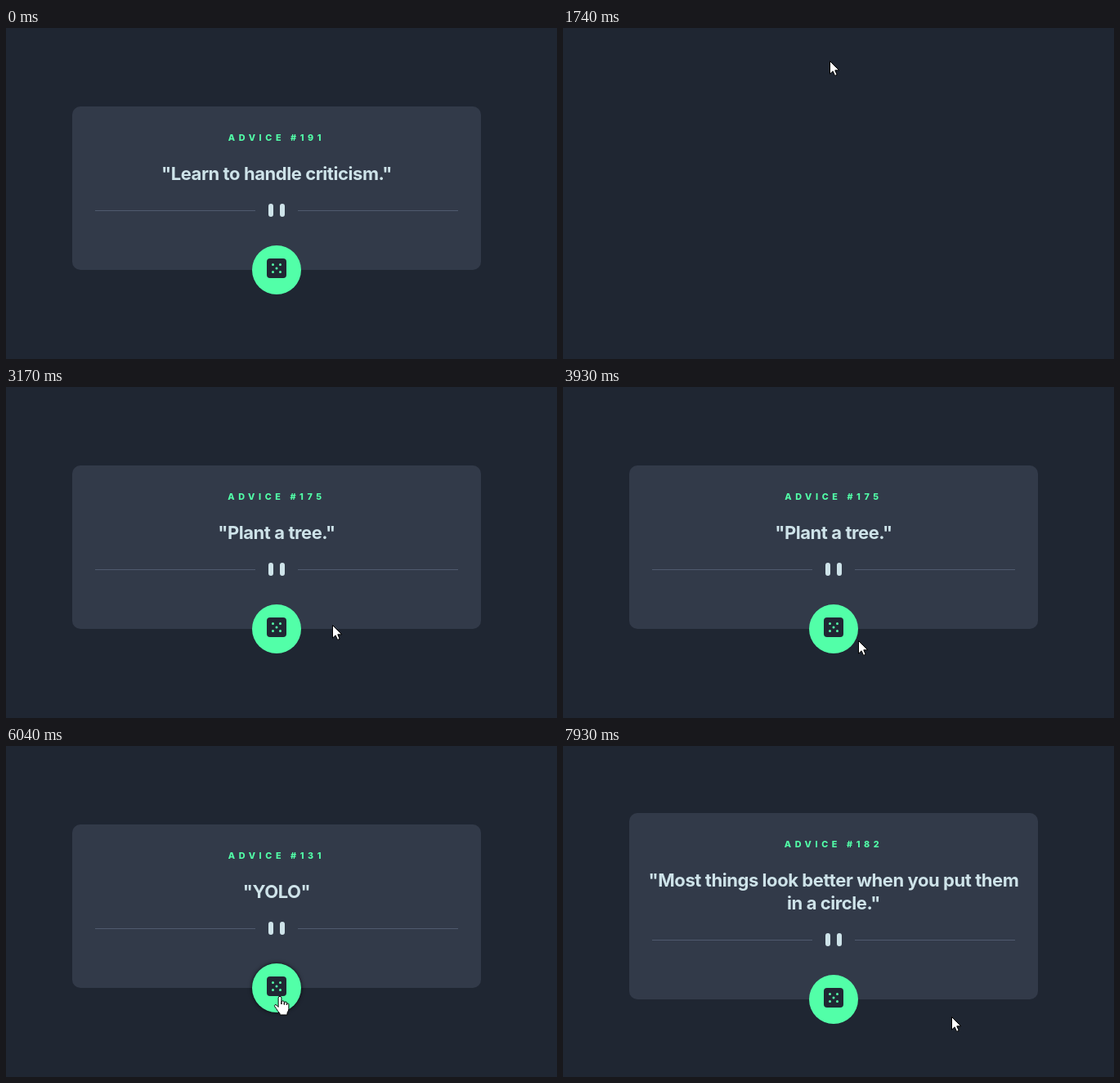
Write an HTML page that moves like this. It is 674 px wide and 405 px high and loops after 8 s.

```html
<!DOCTYPE html>
<html lang="en">
<head>
<meta charset="utf-8">
<title>Advice generator</title>
<style>
  html, body { margin: 0; width: 100%; height: 100%; overflow: hidden; background: #1f2632; }
  svg { display: block; width: 674px; height: 405px; }
  text { font-family: Inter, "Open Sans", sans-serif; text-anchor: middle; }
  #label { font-size: 10.8px; font-weight: 800; letter-spacing: 4.6px; fill: #52ffa8; }
  .quote { font-size: 22px; font-weight: 700; letter-spacing: -.43px; fill: #cee3e9; }
  .rule { stroke: #4f5a6e; }
  .bars { stroke: #cee3e9; stroke-width: 6; stroke-linecap: round; }
  .dots { stroke: #52ffa8; stroke-width: 3; stroke-linecap: round; }
  #button { fill: #52ffa8; }
  #button.hover { filter: drop-shadow(0 0 2.5px rgba(0, 0, 0, .75)); }
  #button.press { fill: #4bea9b; }
  #cursor path { fill: #fff; stroke: #000; stroke-linejoin: round; }
</style>
</head>
<body>
<svg viewBox="0 0 674 405">
  <g id="card">
    <rect id="panel" x="81" width="500" rx="10" fill="#323a49"/>
    <text id="label" x="331"></text>
    <text id="line1" class="quote" x="331"></text>
    <text id="line2" class="quote" x="331"></text>
    <g id="foot">
      <path class="rule" d="M109 223.5H305M357 223.5H553"/>
      <path class="bars" d="M324 218V228M338 218V228"/>
      <circle id="button" cx="331" cy="296" r="30"/>
      <rect x="319" y="282" width="24" height="24" rx="4" fill="#202733"/>
      <path class="dots" d="M326.5 289.5h0M335.5 289.5h0M331 294h0M326.5 298.5h0M335.5 298.5h0"/>
    </g>
  </g>
  <g id="cursor">
    <path id="arrow" d="M.5 .5V16.2L4.1 12.8L6.6 18.4L9.2 17.3L6.8 11.8H11.8Z"/>
    <path id="hand" d="M-1.9 2.2a1.9 1.9 0 0 1 3.8 0V10V7.6a1.7 1.7 0 0 1 3.4 0V10.5V8.6a1.6 1.6 0 0 1 3.2 0V11V9.8a1.3 1.3 0 0 1 2.4 0V15.5C10.9 18 9.2 19 9 21V23H0V21.4C-1.6 19.4 -3.4 17.4 -4.4 15.4L-6.4 12.6C-7.3 10.8 -5.2 9.9 -4 11.2L-1.9 13.4Z"/>
  </g>
</svg>
<script>
const LOOP = 8000;
const STEP = 68; // the pointer is redrawn once per step
const $ = id => document.getElementById(id);

// The card is hidden while the page reloads.
const cards = [
  { at: 0, no: 191, lines: ['"Learn to handle criticism."'] },
  { at: 1740, hidden: true },
  { at: 2070, no: 175, lines: ['"Plant a tree."'] },
  { at: 4610, no: 131, lines: ['"YOLO"'] },
  { at: 6240, no: 182, lines: ['"Most things look better when you put them', 'in a circle."'] }
];

// Each stroke starts where the one before ended and swings out by its bend.
const entry = [599, 355];
const strokes = [
  { at: 190, steps: 13, to: [326, 40], bend: [-40, -20] },
  { at: 2330, steps: 14, to: [339, 309], bend: [275, 5] },
  { at: 3380, steps: 11, to: [335, 306], bend: [47, 6] },
  { at: 4940, steps: 12, to: [335, 306], bend: [-89, 30] },
  { at: 6670, steps: 5, to: [348, 285], bend: [14, 0] },
  { at: 7010, steps: 7, to: [310, 82], bend: [-98, 0] },
  { at: 7510, steps: 7, to: [475, 331], bend: [100, 0] }
];
strokes.forEach((s, i) => { s.from = i ? strokes[i - 1].to : entry; });

const clicks = [4210, 5840];

const latest = (list, t) => list.filter(item => item.at <= t).pop();
const show = (node, on) => node.setAttribute('display', on ? 'inline' : 'none');

function pointer(t) {
  const s = latest(strokes, t);
  if (!s) return null;
  const u = Math.min((Math.floor((t - s.at) / STEP) + 1) / s.steps, 1);
  const swing = Math.sin(Math.PI * u);
  return s.from.map((a, i) => Math.round(a + (s.to[i] - a) * u + s.bend[i] * swing));
}

// A second line makes the card grow evenly up and down; returns the shift.
function drawCard(card) {
  show($('card'), !card.hidden);
  if (card.hidden) return 0;
  const shift = (card.lines.length - 1) * 14;
  const top = 96 - shift;
  $('panel').setAttribute('y', top);
  $('panel').setAttribute('height', 200 + 2 * shift);
  $('label').setAttribute('y', top + 41.5);
  $('label').textContent = 'ADVICE #' + card.no;
  ['line1', 'line2'].forEach((id, i) => {
    $(id).setAttribute('y', top + 90 + 28 * i);
    $(id).textContent = card.lines[i] || '';
  });
  $('foot').setAttribute('transform', `translate(0 ${shift})`);
  return shift;
}

let shown, shift;
function frame(now) {
  const t = now % LOOP;
  const card = latest(cards, t);
  if (card !== shown) {
    shown = card;
    shift = drawCard(card);
  }
  const pos = pointer(t);
  const over = !!pos && !card.hidden && Math.hypot(pos[0] - 331, pos[1] - 296 - shift) < 30;
  $('button').classList.toggle('hover', over);
  $('button').classList.toggle('press', clicks.some(c => t >= c && t < c + 2 * STEP));
  show($('cursor'), pos);
  if (pos) $('cursor').setAttribute('transform', `translate(${pos})`);
  show($('arrow'), !over);
  show($('hand'), over);
  requestAnimationFrame(frame);
}
frame(performance.now());
</script>
</body>
</html>
```
